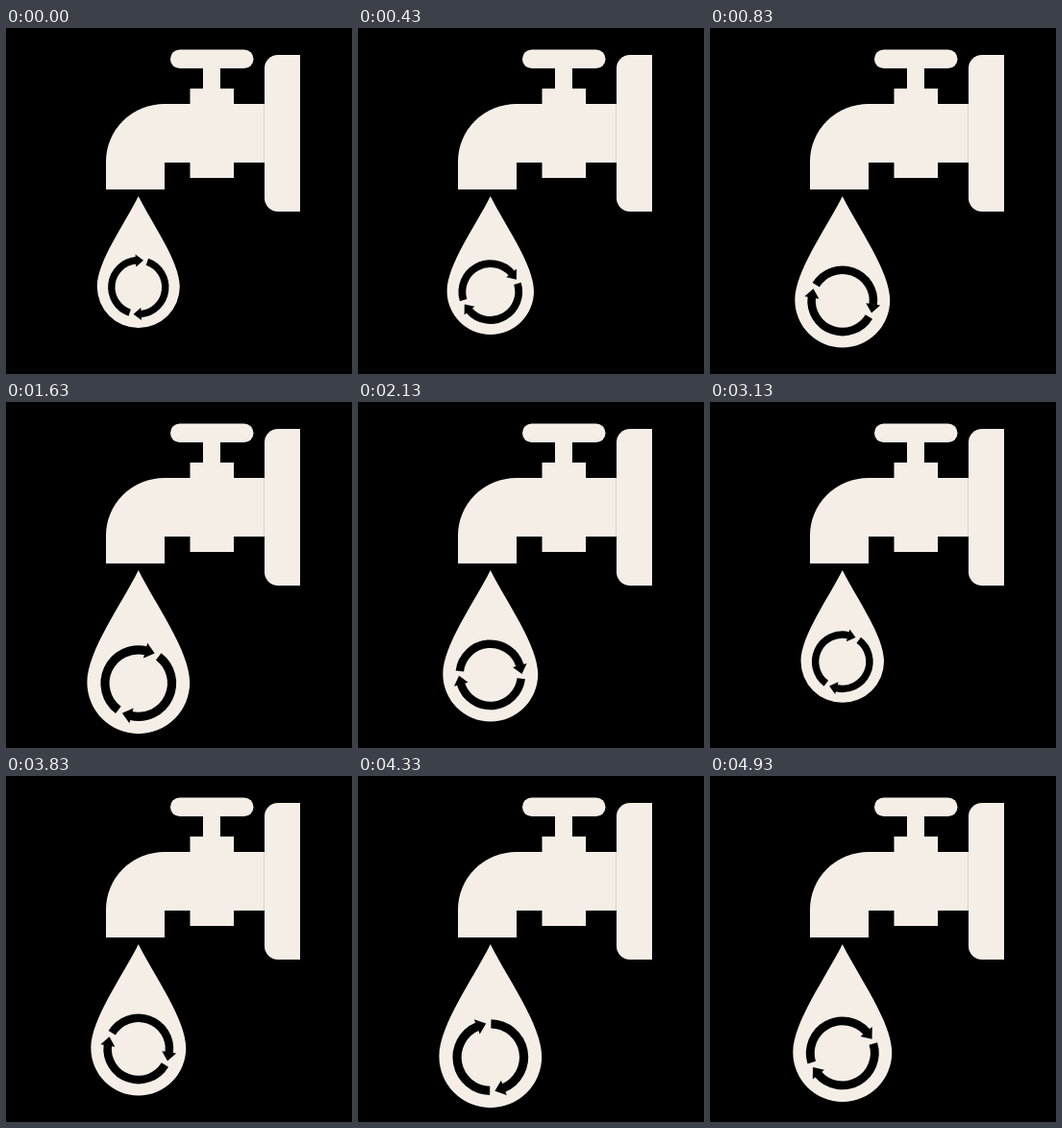
An HTML page that plays this animation: 360 by 360 pixels, repeating every 5000 ms.

```html
<!DOCTYPE html>
<html lang="en">
<head>
<meta charset="utf-8">
<title>Tap and recycled drop</title>
<style>
  html, body { margin: 0; width: 100%; height: 100%; overflow: hidden; background: #000; }
  svg { display: block; width: 100vw; height: 100vh; }
  .light { fill: #f5eee7; }
</style>
</head>
<body>
<svg viewBox="0 0 360 360">
  <defs>
    <g id="arrow">
      <path d="M-9.12 26.47A28 28 0 0 1 -2.44 -27.89" fill="none" stroke="#000" stroke-width="7.4"/>
      <path d="M-3.200 -34.300L5.200 -28L-2.500 -21.200Z"/>
    </g>
  </defs>

  <g class="light">
    <rect x="171" y="22.500" width="86.500" height="19.500" rx="9.750"/>
    <rect x="205" y="40" width="18" height="25"/>
    <rect x="191.500" y="63" width="45.500" height="93"/>
    <path d="M269 79H165A61 60 0 0 0 104 139V168H165V140H269Z"/>
    <path d="M306 28H283A14 14 0 0 0 269 42V177A14 14 0 0 0 283 191H306Z"/>
  </g>
  <path d="M268.500 79V140" stroke="#d6d2ce"/>

  <g id="drop">
    <path class="light" d="M0 0C14.500 29 43 68 43 94A43 43 0 0 1 -43 94C-43 68 -14.500 29 0 0Z"/>
    <g id="cycle">
      <use href="#arrow"/>
      <use href="#arrow" transform="rotate(180)"/>
    </g>
  </g>
</svg>
<script>
  const LOOP = 5000, PERIOD = 3000, STEP = 50;
  const drop = document.getElementById("drop");
  const cycle = document.getElementById("cycle");
  const start = performance.now();

  // Steps are held alternately for 30 and 70 ms.
  function stepTime(ms) {
    const pair = Math.floor(ms / 100);
    return pair * 100 + (ms - pair * 100 >= 30 ? STEP : 0);
  }

  function draw() {
    const turn = stepTime((performance.now() - start) % LOOP) / PERIOD;
    const scale = 1.124 - 0.124 * Math.cos(turn * 2 * Math.PI);
    drop.setAttribute("transform", `translate(137.800 175) scale(${scale})`);
    cycle.setAttribute("transform", `translate(0 94.700) rotate(${turn * 360})`);
    requestAnimationFrame(draw);
  }
  draw();
</script>
</body>
</html>
```
